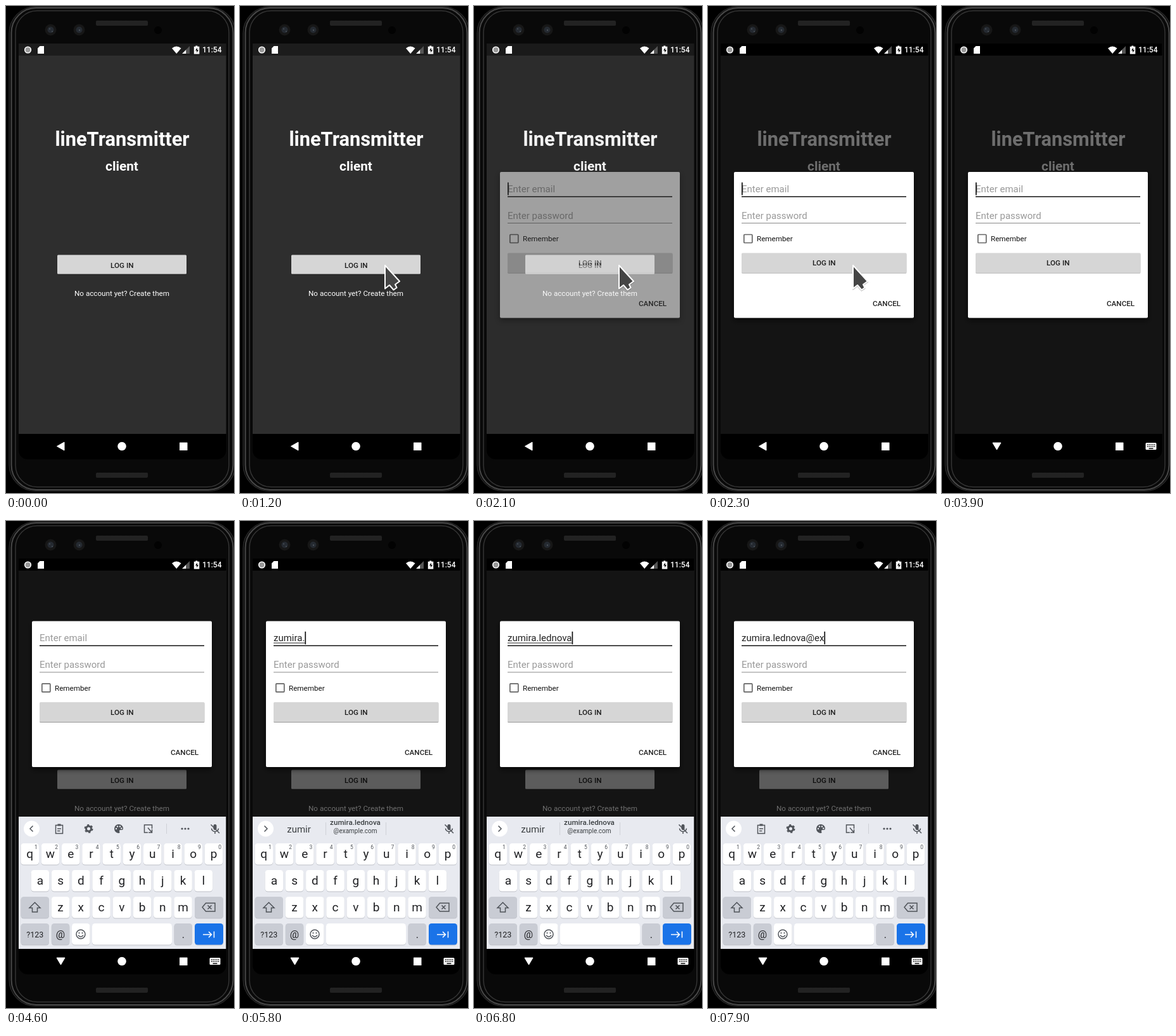
These frames come from a looping animation (360x766 px, 8 s). An HTML page:

```html
<!DOCTYPE html>
<html lang="en">
<head>
<meta charset="utf-8">
<title>Login demo</title>
<style>
  html, body { margin: 0; height: 100%; overflow: hidden; background: #000; }
  svg { display: block; width: 100vw; height: 100vh; }
  text { font: 11.66px Roboto, sans-serif; white-space: pre; }
  .mid { text-anchor: middle; }
  .med { font-weight: 500; }
  .field { font-size: 15px; }
  .hint { fill: #999; }
  .line { fill: none; stroke: #50545a; stroke-width: 1.5; }
</style>
</head>
<body>
<svg viewBox="0 0 360 766">
  <defs>
    <clipPath id="screen"><path d="M20 59H347.5V699a14 14 0 0 1-14 14H34a14 14 0 0 1-14-14Z"/></clipPath>
    <clipPath id="app"><path d="M20 78H347.5V673H20Z"/></clipPath>
    <pattern id="mesh" width="2" height="2" patternUnits="userSpaceOnUse"><path fill="#303030" d="M0 0h1v1H0ZM1 1h1v1H1Z"/></pattern>
    <filter id="shadow" x="-10%" y="-10%" width="120%" height="130%"><feDropShadow dx="0" dy="4" stdDeviation="4" flood-opacity=".6"/></filter>
    <filter id="lift" x="-5%" y="-10%" width="110%" height="130%"><feDropShadow dx="0" dy="1" stdDeviation=".7" flood-opacity=".4"/></filter>
  </defs>

  <!-- phone body -->
  <g fill="none">
    <rect x="5" y="1" width="357" height="762" rx="42" fill="#090909" stroke="#262626" stroke-width="1.500"/>
    <rect x="8.500" y="3" width="350" height="758" rx="39" stroke="#484848" stroke-width="2"/>
    <rect x="15" y="7.500" width="337" height="749" rx="34" stroke="#343434" stroke-width="1.500"/>
    <g fill="#171717"><circle cx="70.500" cy="37.500" r="9"/><circle cx="115.500" cy="37.500" r="9"/></g>
    <g fill="#252a31"><circle cx="70.500" cy="37.500" r="5"/><circle cx="115.500" cy="37.500" r="5"/></g>
    <g fill="#4a5058"><circle cx="69" cy="36" r="1"/><circle cx="73" cy="40" r="1"/><circle cx="116" cy="38" r="1.200"/></g>
    <circle cx="240" cy="38" r="6" fill="#020202"/>
    <g fill="#151515"><rect x="142" y="23" width="82" height="8" rx="2"/><rect x="142" y="734" width="82" height="8" rx="2"/></g>
    <g fill="url(#mesh)"><rect x="142" y="23" width="82" height="8" rx="2"/><rect x="142" y="734" width="82" height="8" rx="2"/></g>
  </g>

  <g clip-path="url(#screen)">
    <rect x="20" y="59" width="328" height="20" fill="#1c1c1c"/>
    <rect x="20" y="78" width="328" height="595" fill="#2e2e2e"/>
    <g class="mid" fill="#fff">
      <text x="183.500" y="219.500" style="font-size:30.8px;font-weight:700">lineTransmitter</text>
      <text x="183" y="259" style="font-size:20.8px;font-weight:700">client</text>
      <text x="183" y="456">No account yet? Create them</text>
    </g>
    <rect x="81" y="391.500" width="204" height="30" rx="1.500" fill="#d6d6d6" filter="url(#lift)"/>
    <rect id="press" x="81" y="391.500" width="204" height="30" rx="1.500" opacity="0"/>
    <text class="mid med" x="183.300" y="411.500" fill="#1c1c1c">LOG IN</text>
    <rect id="dim" x="20" y="78" width="328" height="595" opacity="0"/>
    <rect id="statusDim" x="20" y="59" width="328" height="19" opacity="0"/>

    <!-- status icons -->
    <g fill="#fff">
      <circle cx="34.500" cy="69" r="4.800" fill="#999" stroke="#fff" stroke-width="1.600"/>
      <path d="M53.500 63H60V75H50V66.500ZM262 66.500Q269 60.500 276.500 66.500L269.200 75ZM278 75L284.500 68.500V75ZM299.300 62.500h3v1.300h3V75.500h-8.500V63.800h2.500Z"/>
      <path d="M284.500 68.500L290 63V75H284.500Z" fill="#555"/>
      <path d="M302 65.500l-3 4.500h2v3.500l3-4.500h-2Z" fill="#111"/>
      <text class="med" x="310" y="73.300" style="font-size:12px">11:54</text>
    </g>

    <g id="dialog" opacity="0">
      <rect x="41" y="261" width="284" height="229.500" rx="2" fill="#fff" filter="url(#shadow)"/>
      <text id="emailHint" class="field hint" x="53" y="293">Enter email</text>
      <text id="email" class="field" x="53" y="293" fill="#222"></text>
      <path id="compose" d="" stroke="#222"/>
      <rect id="caret" y="277.500" width="1.700" height="20" fill="#111"/>
      <path d="M53 299.800H313" stroke="#333" stroke-width="1.700"/>
      <text class="field hint" x="53" y="335">Enter password</text>
      <path d="M53 341.500H313" stroke="#8a8a8a"/>
      <rect x="56.800" y="359.500" width="13" height="13" rx="1" fill="none" stroke="#666" stroke-width="1.700"/>
      <text x="77" y="370.300" fill="#111">Remember</text>
      <rect x="53" y="388.500" width="260.500" height="31" rx="1.500" fill="#d6d6d6" filter="url(#lift)"/>
      <text class="mid med" x="183.300" y="408.300" fill="#1c1c1c">LOG IN</text>
      <text class="med" x="260" y="471.700" fill="#222">CANCEL</text>
    </g>

    <g clip-path="url(#app)">
      <g id="keyboard">
        <rect x="20" y="465" width="328" height="208" fill="#e8eaf0"/>
        <circle cx="40.500" cy="484" r="12.500" fill="#fff"/>
        <path id="chevron" class="line"/>
        <g id="suggestions" class="mid" fill="#3c4043">
          <path d="M135.500 474V494M230.500 474V494" stroke="#cfd1d7"/>
          <text x="93" y="489.500" class="field">zumir</text>
          <text x="182" y="478" class="med">zumira.lednova</text>
          <text x="182" y="491" style="font-size:10px">@example.com</text>
        </g>
        <g id="tools" class="line">
          <path d="M78.500 478.500H89.500V491.500H78.500ZM81 484H87M81 487.500H85.500"/>
          <path d="M81.500 476.500h5v3h-5Z" fill="#50545a" stroke="none"/>
          <circle cx="130.500" cy="484" r="4" stroke-width="3"/>
          <circle cx="130.500" cy="484" r="6" stroke-width="2" stroke-dasharray="3.100 3.183"/>
          <path d="M178 477a7 7 0 1 0 0 14q2.500-.5 1-3q-.5-2 2-2h2q2 0 2-2.500a7 7 0 0 0-7-6.500Z" fill="#50545a" stroke="none"/>
          <g fill="#e8eaf0" stroke="none"><circle cx="174" cy="484" r="1.200"/><circle cx="176" cy="480.500" r="1.200"/><circle cx="180" cy="480.500" r="1.200"/><circle cx="182.300" cy="483.500" r="1.200"/></g>
          <path d="M224 490H218.500V478H230.500V484M224 482.500L230 489.500M225 490H230.500V485"/>
          <path d="M253.500 476V492" stroke="#cfd1d7" stroke-width="1"/>
          <g fill="#50545a" stroke="none"><circle cx="278" cy="484" r="1.600"/><circle cx="283" cy="484" r="1.600"/><circle cx="288" cy="484" r="1.600"/></g>
        </g>
        <rect x="327.500" y="477" width="5" height="9" rx="2.500" fill="#50545a"/>
        <path class="line" d="M324.500 483.500a5.500 5 0 0 0 11 0M330 488.500V492M323.500 477.500L337 491"/>
        <g id="keys"></g>
        <g class="line">
          <path d="M45.500 600L54 608.500H49.500V615H41.500V608.500H37Z"/>
          <path d="M310 607.500L315.500 601H330V614H315.500ZM318.500 604.500l6 6m0-6l-6 6"/>
          <circle cx="118" cy="650" r="7"/><path d="M114 651.500q4 5 8 0"/>
          <path d="M311 650.500H324M320 646l4.500 4.500-4.500 4.500M328.500 645.500V655.500" stroke="#fff"/>
        </g>
        <g fill="#50545a"><circle cx="115.500" cy="648" r="1.100"/><circle cx="120.500" cy="648" r="1.100"/></g>
      </g>
    </g>

    <!-- navigation bar -->
    <rect x="20" y="673" width="328" height="40"/>
    <g fill="#fff">
      <path id="back" stroke="#fff" stroke-linejoin="round"/>
      <circle cx="183" cy="692.500" r="6.800"/>
      <rect x="274" y="686.500" width="12.500" height="12.500" rx=".5"/>
      <g id="imeIcon">
        <rect x="321.500" y="687" width="17" height="11" rx="1.500"/>
        <path d="M324 690H336.500M324 692.800H336.500" stroke="#000" stroke-width="1.500" stroke-dasharray="1.500 1.200"/>
        <path d="M326.500 696H333.500" stroke="#000" stroke-width="1.300"/>
      </g>
    </g>
  </g>
  <path id="cursor" d="M1 2V38.500L8 33L14.500 40.500L19.500 37L17 32L24 27Z" fill="#444" stroke="#fff" stroke-width="2" stroke-linejoin="round" filter="url(#lift)"/>
</svg>

<script>
const $ = id => document.getElementById(id);
const set = (id, name, value) => $(id).setAttribute(name, value);
const show = (id, on) => set(id, 'visibility', on ? 'visible' : 'hidden');

// Keyboard keys
const keys = [];
const key = (x, y, w, label = '', fill = '#fff', size = 19, dy = 23) => keys.push(
  `<rect x="${x}" y="${y + 1}" width="${w}" height="33.500" rx="4.500" fill="#bfc2c9"/>`,
  `<rect x="${x}" y="${y}" width="${w}" height="33.500" rx="4.500" fill="${fill}"/>`,
  `<text class="mid" x="${x + w / 2}" y="${y + dy}" fill="#202124" style="font-size:${size}px">${label}</text>`);
const grey = '#c9ccd4';
[['qwertyuiop', 23.5, 507], ['asdfghjkl', 39.6, 549], ['zxcvbnm', 71.8, 591]].forEach(([row, left, y], r) =>
  [...row].forEach((letter, i) => {
    const x = left + i * 32.25;
    key(x, y, 28.5, letter);
    if (r === 0) keys.push(`<text class="mid" x="${x + 24}" y="516" fill="#50545a" style="font-size:8.5px">${(i + 1) % 10}</text>`);
  }));
key(23.5, 591, 44.5, '', grey);
key(298, 591, 45, '', grey);
key(23.5, 633, 44.5, '?123', grey, 12.5, 22);
key(71.8, 633, 28.5, '@', grey, 16, 23);
key(104, 633, 28.5);
key(136, 633, 126);
key(265.5, 633, 28.5, '.', grey, 16);
key(298, 633, 45, '', '#1a73e8');
$('keys').innerHTML = keys.join('');

const clamp = v => Math.min(1, Math.max(0, v));
const easeOut = p => 1 - (1 - p) ** 3;

// Piecewise linear track of [time, ...values]
function track(t, points) {
  const next = points.findIndex(p => p[0] > t);
  if (next < 0) return points.at(-1).slice(1);
  if (next === 0) return points[0].slice(1);
  const a = points[next - 1], b = points[next], p = (t - a[0]) / (b[0] - a[0]);
  return a.slice(1).map((v, i) => v + (b[i + 1] - v) * p);
}

const address = 'zumira.lednova@ex';
const strokes = [4700, 4900, 5000, 5200, 5300, 5500, 5700, 5900, 6000, 6200, 6300, 6500, 6600, 6800, 7300, 7600, 7900];
const cursorPath = [[100, 264, 654], [500, 257, 436], [700, 257, 436], [1000, 228, 406], [2500, 228, 406],
  [2800, 277, 428], [3400, 119, 263], [3600, 44, 229]];

function draw(t) {
  const [x, y] = track(t, cursorPath);
  set('cursor', 'transform', `translate(${x} ${y})`);
  show('cursor', t >= 100 && t < 3800);

  set('press', 'opacity', track(t, [[1600, 0], [1800, .08], [2000, .04], [2100, 0]])[0]);
  const [dim] = track(t, [[2000, 0], [2100, .08], [2200, .67], [2300, 1]]);
  set('dim', 'opacity', dim * .57);
  set('statusDim', 'opacity', dim);
  set('dialog', 'opacity', track(t, [[2000, 0], [2100, .55], [2200, 1]])[0]);
  set('dialog', 'transform', `translate(0 ${-103.6 * easeOut(clamp((t - 3900) / 520))})`);

  const typed = strokes.filter(s => s <= t).length;
  $('email').textContent = address.slice(0, typed);
  const width = typed ? $('email').getComputedTextLength() : 0;
  show('emailHint', !typed);
  set('compose', 'd', typed && typed < 15 ? `M53 295.500h${width}` : '');
  set('caret', 'x', 53 + width);
  const blinkStart = typed ? strokes[typed - 1] : t < 3800 ? 2000 : 3800;
  show('caret', (t - blinkStart) % 1000 <= 500);

  set('keyboard', 'transform', `translate(0 ${208 * (1 - easeOut(clamp((t - 4300) / 300)))})`);
  const suggesting = t >= 4800 && t < 7400;
  show('suggestions', suggesting);
  show('tools', !suggesting);
  set('chevron', 'd', suggesting ? 'M38.500 479.500l4.500 4.500-4.500 4.500' : 'M42.500 479.500l-4.500 4.500 4.500 4.500');

  const imeOpen = t >= 3800;
  set('back', 'd', imeOpen ? 'M80 687H93L86.500 698Z' : 'M92 686V699L80.500 692.500Z');
  show('imeIcon', imeOpen);
}

const start = performance.now();
function tick() {
  const t = (performance.now() - start) % 8000;
  draw(Math.floor(t / 100) * 100); // ten pictures a second
  requestAnimationFrame(tick);
}
tick();
</script>
</body>
</html>
```
